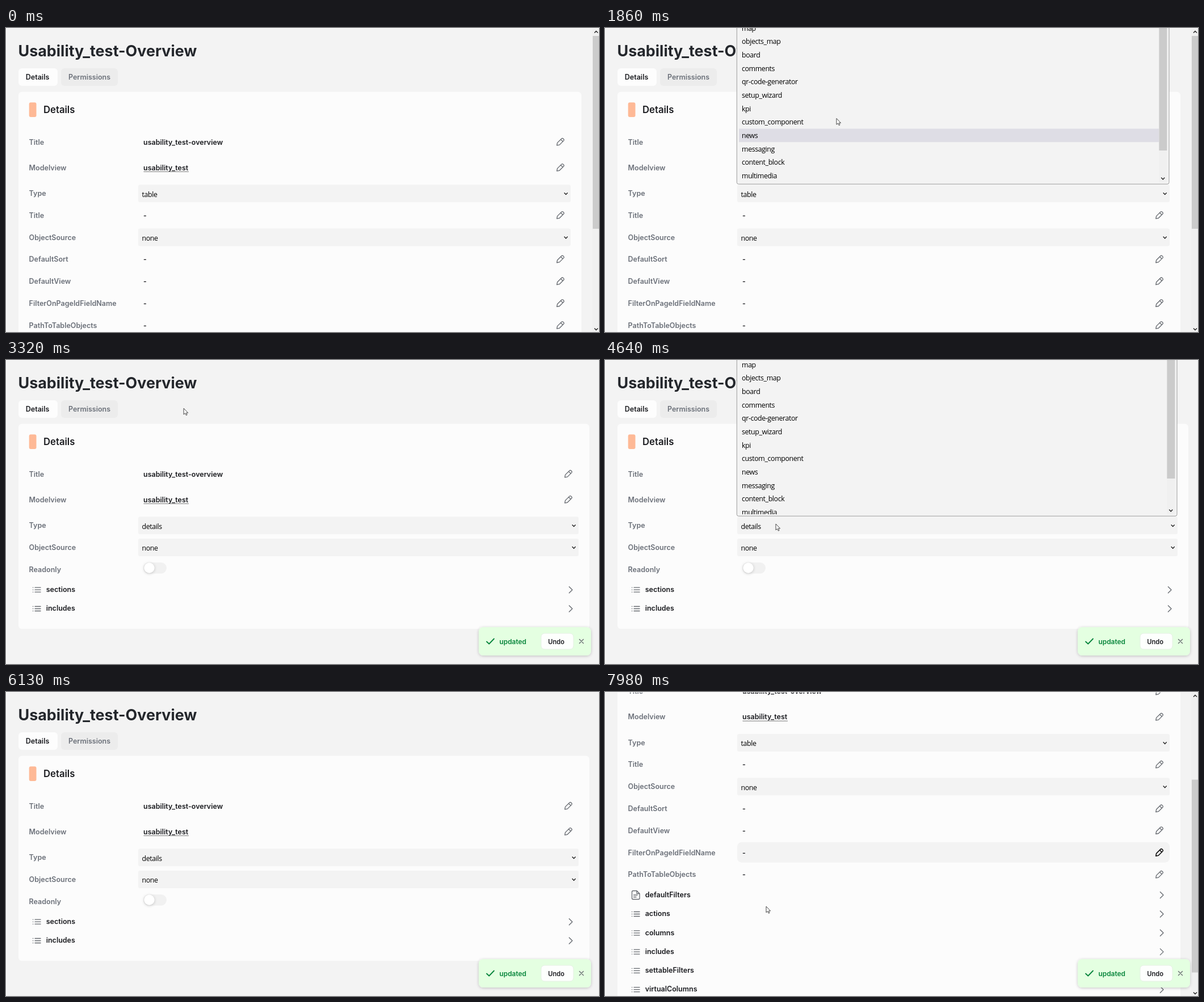
An HTML page for the animation above (8000 ms loop, 1045 px wide and 536 px high).

```html
<!DOCTYPE html>
<html lang="en">
<head>
<meta charset="utf-8">
<title>Settings page</title>
<style>
  html, body { margin: 0; width: 100%; height: 100%; overflow: hidden; background: #f3f3f3; }
  svg { display: block; }
  text { font: 600 12.5px Inter, sans-serif; fill: #1b1c20; white-space: pre; }
  .title { font-size: 26.9px; font-weight: 700; fill: #24272c; }
  .heading { font-size: 16.7px; }
  .label { fill: #6b7079; }
  .option { font: 400 12.4px "Open Sans", sans-serif; letter-spacing: -.4px; fill: #000; }
  .toast { font-size: 11.9px; fill: #07853b; }
  .undo { font-size: 11.2px; }
  .line { fill: none; stroke: #64686e; stroke-width: 1.3; stroke-linecap: round; stroke-linejoin: round; }
  .check { fill: none; stroke: #07853b; stroke-width: 1.8; stroke-linecap: round; stroke-linejoin: round; }
  .arrow { fill: none; stroke: #222; stroke-width: 1.4; }
  .hoverBg { fill: #f3f3f3; visibility: hidden; }
  .hovered .hoverBg { visibility: inherit; }
  .hovered .line { stroke: #111; stroke-width: 1.6; }
</style>
</head>
<body>
<svg id="stage" width="1045" height="536" viewBox="0 0 1045 536"></svg>
<script>
const LOOP = 8000;
const ROW = 23.67;
const OPTIONS = ['map', 'objects_map', 'board', 'comments', 'qr-code-generator', 'setup_wizard',
  'kpi', 'custom_component', 'news', 'messaging', 'content_block', 'multimedia'];

// Building blocks; y is the vertical centre of the text or icon.
const text = (x, y, s, cls = '') => `<text x="${x}" y="${y + 4.5}" class="${cls}">${s}</text>`;
const rect = (x, y, w, h, fill, r = 0, extra = '') =>
  `<rect x="${x}" y="${y}" width="${w}" height="${h}" rx="${r}" fill="${fill}" ${extra}/>`;
const path = (d, cls = 'line', x = 0, y = 0, turn = 0) =>
  `<path d="${d}" class="${cls}" transform="translate(${x} ${y}) rotate(${turn})"/>`;
const pen = (x, y) =>
  path('M-2.6 4.6V-6a1.8 1.8 0 0 1 1.8-1.8H.8A1.8 1.8 0 0 1 2.6-6V4.6L0 8.4ZM-2.6-3.8H2.6', 'line', x, y, 45);
const chevron = (x, y) => path('M-2.8-5.5L2.8 0L-2.8 5.5', 'line', x, y);
const caret = (x, y) => path('M-3-1.6L0 1.6L3-1.6', 'arrow', x, y);
const listIcon = y => path('M47.5-4h.2M47.5 0h.2M47.5 4h.2M51-4H61M51 0H61M51 4H61', 'line', 0, y);
const docIcon = y =>
  path('M56-7.5H49.5A2 2 0 0 0 47.5-5.5V5.5A2 2 0 0 0 49.5 7.5H59A2 2 0 0 0 61 5.5V-2.5ZV-2.5H61M50.5 0H57M50.5 3.5H55',
    'line', 0, y);

const label = (y, s) => text(40.6, y, s, 'label');
const field = (right, y, name, value) => label(y, name) +
  `<g class="field" data-y="${y}">${rect(233, y - 18.5, right - 233, 36, '', 8, 'class="hoverBg"')}
  ${text(242, y, value)}${pen(right - 18.3, y)}</g>`;
const select = (right, y, name, value) => label(y, name) +
  rect(233, y - 15.5, right - 233, 31, '#f3f3f3', 3) + text(239.5, y + 1.3, value, 'option') +
  caret(right - 8.3, y + .3);
const section = (right, y, name, icon = listIcon) =>
  icon(y + .7) + text(70.7, y, name) + chevron(right - 13.8, y + .7);

const pageTop = (right, bottom, type) =>
  text(21.5, 45.5, 'Usability_test-Overview', 'title') +
  rect(22, 71, 69, 31, '#fdfdfd', 6) + text(34.8, 86.3, 'Details') +
  rect(97, 71, 100, 31, '#ececec', 6) + text(110, 86.3, 'Permissions', 'label') +
  rect(22, 112.5, right + 19 - 22, bottom - 112.5, '#fcfcfc', 6) +
  rect(40.7, 131.3, 12.8, 25.6, '#feb996', 3) + text(66, 145.6, 'Details', 'heading') +
  field(right, 201, 'Title', 'usability_test-overview') +
  field(right, 246.2, 'Modelview', 'usability_test') +
  rect(242.5, 252.8, 79.5, 1, '#777') +
  select(right, 291.7, 'Type', type);

const tablePage = pageTop(995, 762, 'table') +
  field(995, 330.2, 'Title', '-') +
  select(995, 369, 'ObjectSource', 'none') +
  ['DefaultSort', 'DefaultView', 'FilterOnPageIdFieldName', 'PathToTableObjects']
    .map((name, i) => field(995, 407.8 + i * 38.8, name, '-')).join('') +
  section(995, 559.5, 'defaultFilters', docIcon) +
  ['actions', 'columns', 'includes', 'settableFilters', 'virtualColumns']
    .map((name, i) => section(995, 593 + i * 33.3, name)).join('');

const detailsPage = pageTop(1009, 474, 'details') +
  select(1009, 330.4, 'ObjectSource', 'none') +
  label(369, 'Readonly') + rect(242, 357, 41, 19.5, '#f1f1f1', 9.7) +
  '<circle cx="252.5" cy="366.5" r="9" fill="#fff" filter="url(#soft)"/>' +
  section(1009, 404.5, 'sections') + section(1009, 437.8, 'includes');

const scrollbar = rect(1033.5, 0, 12, 536, '#f0f0f0') +
  '<rect id="thumb" x="1034" y="14" width="11" height="340" fill="#cbcbcb"/>' +
  path('M-3 1.6L0-1.6L3 1.6', 'arrow', 1040, 7) + caret(1040, 531);

const dropdown = (id, right, top, thumbEnd) => `<g id="${id}">
  ${rect(232.3, -10, right - 232.3, 285.2, '#f3f3f3', 3, 'stroke="#9c9c9c"')}
  <g clip-path="url(#listClip)">
    <rect class="mark" x="236" width="${right - 254}" height="${ROW}" fill="#dedde5"/>
    ${OPTIONS.map((name, i) => text(241, top + i * ROW, name, 'option')).join('')}
  </g>
  ${rect(right - 17.6, 0, 14, 272, '#f0f0f0')}${rect(right - 17.6, 0, 14, thumbEnd, '#cbcbcb')}
  ${caret(right - 10.8, 265.3)}</g>`;

const toast = `<g id="toast">
  ${rect(833, 471, 198, 50, '#e4ffe1', 8, 'filter="url(#soft)"')}
  ${path('M847 496.5L851.3 500.5L860 491.5', 'check')}
  ${text(869.5, 496, 'updated', 'toast')}
  ${rect(943, 482, 57, 28, '#fdfffd', 6, 'stroke="#e6f0e5"')}${text(955.2, 496, 'Undo', 'undo')}
  ${path('M1010.5 492.5l7 7M1017.5 492.5l-7 7')}</g>`;

const stage = document.getElementById('stage');
stage.innerHTML = `<defs>
  <filter id="soft" x="-20%" y="-20%" width="140%" height="150%">
    <feDropShadow dx="0" dy="1" stdDeviation="2.4" flood-opacity=".22"/></filter>
  <clipPath id="listClip"><rect x="233" y="0" width="776" height="272"/></clipPath></defs>
  ${rect(0, 0, 1045, 536, '#f3f3f3')}
  <g id="table"><g id="scroller">${tablePage}</g>${scrollbar}</g>
  <g id="details">${detailsPage}</g>
  ${rect(0, 0, 1.2, 536, '#fff')}${rect(0, 0, 1045, .8, '#fff')}
  ${dropdown('tableMenu', 994, 0, 216)}${dropdown('detailsMenu', 1008, 8, 209)}${toast}
  <path id="cursor" d="M0 0V10.8L2.5 8.6L4.3 12.2L6 11.5L4.3 8H7.6Z" fill="#fff" stroke="#333" stroke-width=".9"/>`;

const $ = id => document.getElementById(id);
const fields = [...$('table').querySelectorAll('.field')];

// [time, x, y]; the pointer is out of sight between the tracks.
const TRACKS = [
  [[470, 470, 512], [700, 450, 450], [1000, 424, 335], [1160, 415, 297], [1780, 415, 297],
   [1860, 408, 160], [2000, 402, 75], [2220, 395, -14]],
  [[3200, 318, -14], [3400, 310, 150], [3560, 303, 265], [3660, 302, 287], [4030, 301, 286], [4170, 300, 287],
   [4640, 301, 289], [5040, 301, 289], [5160, 304, 165], [5350, 308, -14]],
  [[6810, 345, 28], [6960, 312, 220], [7060, 292, 345], [7140, 284, 378], [8000, 284, 378]]
];
const SCROLL = [[7500, 0], [7540, 12], [7640, 83], [7720, 114], [7770, 120], [7870, 165], [7980, 202], [8000, 206]];

function sample(keys, t) {
  if (t <= keys[0][0]) return keys[0].slice(1);
  const i = keys.findIndex(k => k[0] > t);
  if (i < 0) return keys.at(-1).slice(1);
  const [a, b] = [keys[i - 1], keys[i]];
  const p = (t - a[0]) / (b[0] - a[0]);
  return a.slice(1).map((v, n) => v + (b[n + 1] - v) * p);
}

function pointer(t) {
  const track = TRACKS.find(k => t >= k[0][0] && t < k.at(-1)[0]);
  return track && sample(track, t);
}

const show = (id, on) => { $(id).style.display = on ? '' : 'none'; };

// The highlight trails the pointer slightly.
function drawMenu(id, open, top, t) {
  show(id, open);
  const at = pointer(t - 20);
  const row = at ? Math.floor((at[1] - top) / ROW + .5) : -1;
  const mark = $(id).querySelector('.mark');
  const on = open && t < 5350 && at && at[1] > 0 && at[1] < 272 && row < OPTIONS.length;
  mark.style.display = on ? '' : 'none';
  if (on) mark.setAttribute('y', top + (row - .5) * ROW);
}

function draw(t) {
  const onDetails = t >= 2990 && t < 6170;
  show('details', onDetails);
  show('table', !onDetails);

  const [scroll] = sample(SCROLL, t);
  $('scroller').setAttribute('transform', `translate(0 ${-scroll})`);
  $('thumb').setAttribute('y', 14 + scroll * .695);

  drawMenu('tableMenu', t >= 1350 && t < 2820, 0, t);
  drawMenu('detailsMenu', t >= 4430 && t < 6130, 8, t);

  const at = pointer(t);
  show('cursor', at);
  if (at) $('cursor').setAttribute('transform', `translate(${at})`);

  const hoverY = t < 1350 && at ? at[1] : t >= 7750 ? 485.4 : -99;
  for (const f of fields) f.classList.toggle('hovered', Math.abs(f.dataset.y - hoverY) < 18.5);

  const rise = Math.min(1, Math.max(0, (t - 3020) / 260));
  const ease = 1 - (1 - rise) ** 3;
  show('toast', rise > 0);
  $('toast').setAttribute('transform', `translate(0 ${(1 - ease) * 24})`);
  $('toast').setAttribute('opacity', ease);
}

const start = performance.now();
function tick() {
  draw((performance.now() - start) % LOOP);
  requestAnimationFrame(tick);
}
tick();
</script>
</body>
</html>
```
